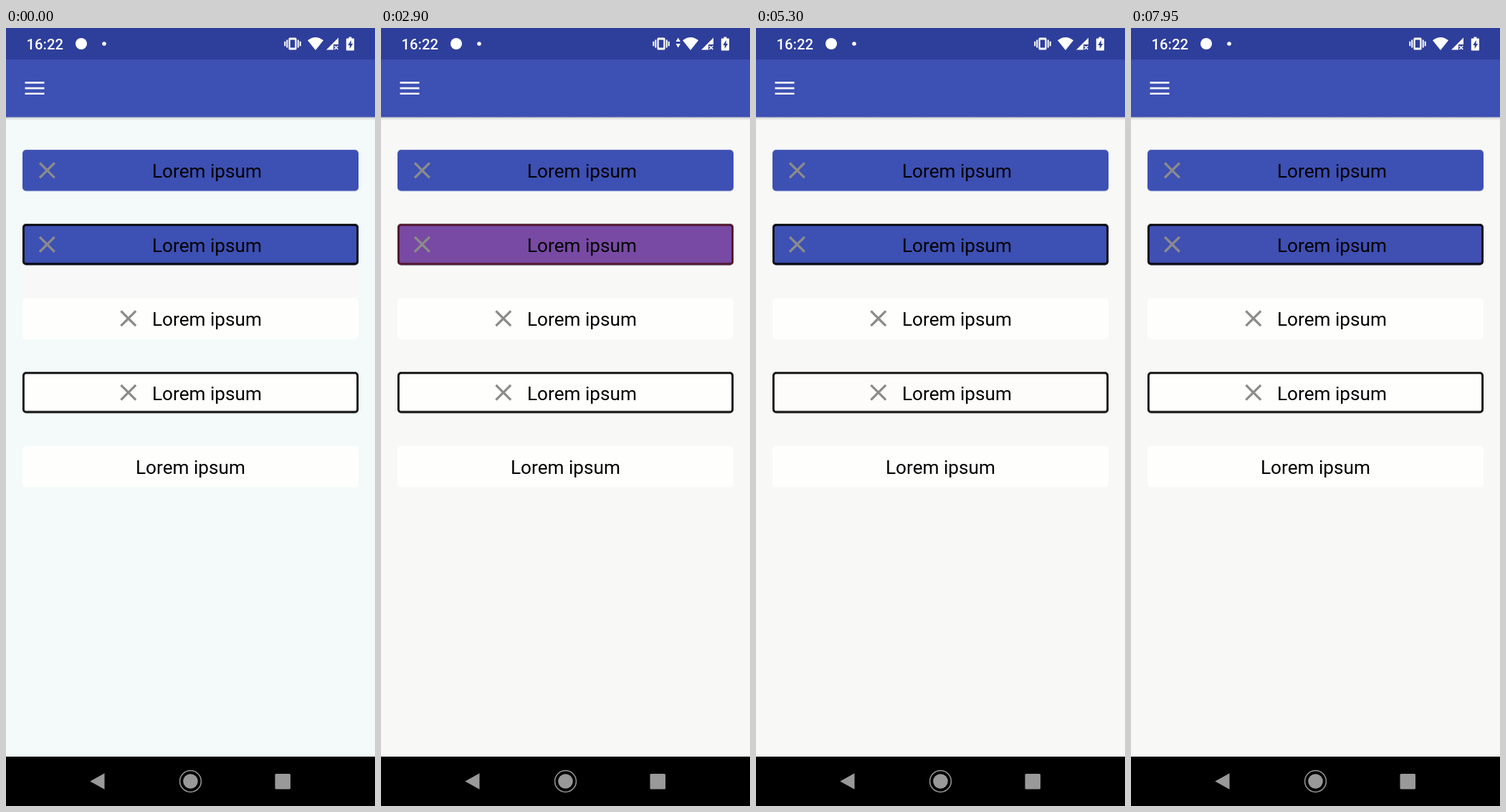
Animation, 515 px wide and 1087 px high, one loop 8 s. Source, as an HTML page:

```html
<!DOCTYPE html>
<html lang="en">
<head>
<meta charset="utf-8">
<title>Ripple buttons</title>
<style>
  html, body { margin: 0; width: 100%; height: 100%; overflow: hidden; background: #f8f9f7; }
  svg { display: block; width: 515px; height: 1087px; font-family: Roboto, sans-serif; }

  .page { fill: #f8f9f7; animation: tint 8s infinite; }
  .tinted { opacity: 0; animation: first 8s infinite; }
  .label { font-size: 26.2px; text-anchor: middle; fill: #000; }
  .cross { fill: #8b8b8b; }

  .ripple { fill: #ff4081; opacity: 0; animation: grow 8s infinite, fade 8s infinite linear; }

  .arrows { opacity: 0; animation: show 8s infinite step-end; }
  .vibrate { animation: shift 8s infinite step-end; }

  @keyframes tint { 0%, .624% { fill: #f3faf9; } .625%, 100% { fill: #f8f9f7; } }
  @keyframes first { 0%, .624% { opacity: 1; } .625%, 100% { opacity: 0; } }

  /* 225 ms spread, 75 ms fade in, 150 ms fade out */
  @keyframes grow {
    0% { transform: translateX(76px) scale(.597); animation-timing-function: cubic-bezier(.4, 0, .2, 1); }
    2.8125%, 100% { transform: none; }
  }
  @keyframes fade {
    0% { opacity: 0; }
    .9375%, 2.8125% { opacity: .5; }
    4.6875%, 100% { opacity: 0; }
  }

  @keyframes show {
    0%, 42.5%, 79.375%, 98.75% { opacity: 0; }
    30%, 67.5%, 91.875% { opacity: 1; }
  }
  @keyframes shift {
    0%, 42.5%, 79.375%, 98.75% { transform: none; }
    30%, 67.5%, 91.875% { transform: translateX(-9px); }
  }
</style>
</head>
<body>
<svg viewBox="0 0 515 1087">
  <defs>
    <linearGradient id="shade" x1="0" y1="0" x2="0" y2="1">
      <stop offset="0" stop-color="#000" stop-opacity=".2"/>
      <stop offset="1" stop-color="#000" stop-opacity="0"/>
    </linearGradient>
    <clipPath id="shape"><rect width="469" height="57.4" rx="5"/></clipPath>
    <path id="cross" class="cross" transform="scale(1.65)"
      d="M7-5.59 5.59-7 0-1.41-5.59-7-7-5.59-1.41 0-7 5.59-5.59 7 0 1.41 5.59 7 7 5.59 1.41 0z"/>
  </defs>

  <rect class="page" width="515" height="1087"/>
  <rect class="tinted" x="23" y="331" width="470" height="47" fill="#f8f8f9"/>

  <rect y="124" width="515" height="5" fill="url(#shade)"/>
  <rect y="44" width="515" height="80.5" fill="#3d50b3"/>
  <rect width="515" height="44" fill="#2e3e9b"/>

  <g fill="#fff">
    <text x="28.5" y="30" font-size="20.3" font-weight="500">16:22</text>
    <circle cx="105" cy="22" r="8"/>
    <circle cx="137" cy="22" r="2.8"/>

    <g class="vibrate">
      <path fill-rule="evenodd" d="M396 13.5h8q1.5 0 1.5 1.5v14q0 1.500-1.500 1.500h-8q-1.500 0-1.500-1.500v-14q0-1.500 1.500-1.500zM396.700 16.500v11h6.600v-11z"/>
      <path d="M391.300 16.500h2v11h-2zM388.300 18.800h2v6.400h-2zM406.700 16.500h2v11h-2zM409.700 18.800h2v6.400h-2z"/>
    </g>
    <path class="arrows" d="M414.700 13.500l3.200 5.500h-6.400zM414.700 27.500l3.200-5.500h-6.400z"/>
    <path d="M432 31 421 17.300Q432 8.700 443 17.300z"/>
    <path d="M464 13.500V23h-7v7.500H447z"/>
    <path d="M458.300 25l5 5m0-5-5 5" stroke="#fff" stroke-width="1.600"/>
    <path d="M478.500 12.500h3.800v2h2.700q1 0 1 1V30.500q0 1-1 1h-9.200q-1 0-1-1V15.500q0-1 1-1h2.700z"/>
    <path d="M481.700 17l-4.500 7h2.500v5l4.500-7h-2.500z" fill="#2e3e9b"/>
    <path d="M26.500 75h27v2.700h-27zM26.500 82.700h27v2.700h-27zM26.500 90.400h27v2.700h-27z" fill="#f3f5fb"/>
  </g>

  <g id="list"></g>

  <rect y="1018" width="515" height="69" fill="#000"/>
  <g fill="#999">
    <path d="M117.300 1052.500 137.500 1041.300V1063.700z"/>
    <circle cx="257.500" cy="1052.500" r="10.300"/>
    <circle cx="257.500" cy="1052.500" r="14.900" fill="none" stroke="#999" stroke-width="1.500"/>
    <rect x="375.500" y="1042" width="21.500" height="21.500" rx="1.500"/>
  </g>
</svg>
<script>
  const BLUE = '#3d50b3', WHITE = '#fefffd';
  // icon: centre of the cross; taps: start times in ms
  const buttons = [
    { fill: BLUE, icon: 34.4, taps: [1790] },
    { fill: BLUE, icon: 34.4, border: true, taps: [890, 2618, 7581] },
    { fill: WHITE, icon: 147.800, taps: [3837, 7130] },
    { fill: WHITE, icon: 147.800, border: true, taps: [4931, 6640] },
    { fill: WHITE, taps: [6075] }
  ];

  const ripple = ms =>
    `<circle class="ripple" r="236.300" style="animation-delay:${ms}ms"/>`;

  const button = (b, i) => `
    <g transform="translate(23 ${170.2 + 103.45 * i})">
      <rect width="469" height="57.400" rx="5" fill="${b.fill}"/>
      ${b.border ? '<rect x="1.400" y="1.400" width="466.200" height="54.600" rx="3.600" fill="none" stroke="#000" stroke-width="2.800"/>' : ''}
      <g clip-path="url(#shape)"><g transform="translate(234.500 28.700)">${b.taps.map(ripple).join('')}</g></g>
      ${b.icon ? `<use href="#cross" x="0" y="0" transform="translate(${b.icon} 28.700)"/>` : ''}
      <text class="label" x="${b.icon ? 257.500 : 234.500}" y="39.200">Lorem ipsum</text>
    </g>`;

  document.getElementById('list').innerHTML = buttons.map(button).join('');
</script>
</body>
</html>
```
